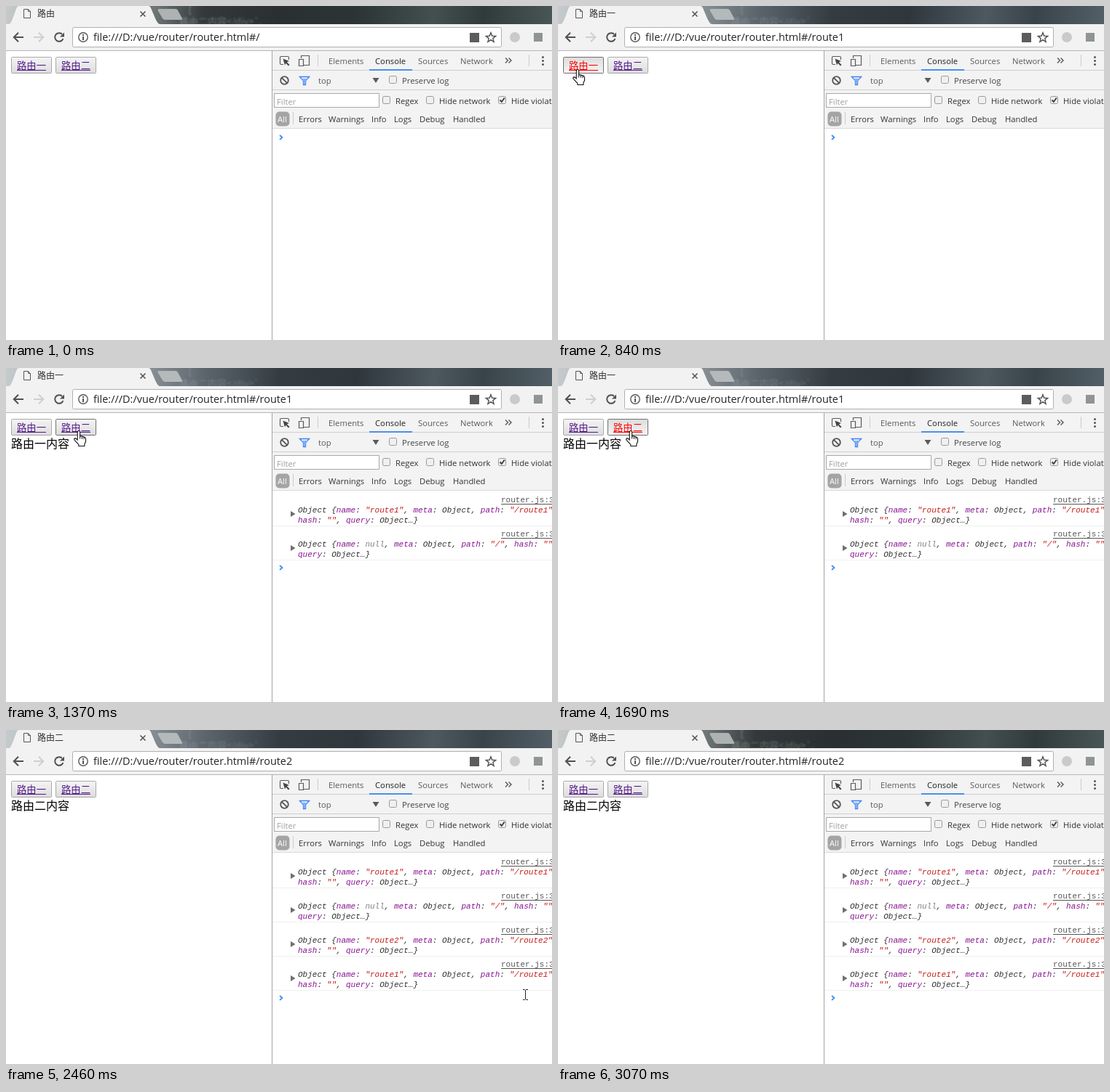
Animation, 750 px wide and 460 px high, one loop 3.15 s. Source, as an HTML page with a canvas:

```html
<!DOCTYPE html>
<html lang="zh">
<head>
<meta charset="utf-8">
<title>路由</title>
<style>
html, body { margin: 0; width: 100%; height: 100%; overflow: hidden; background: #fff; }
canvas { display: block; width: 750px; height: 460px; }
</style>
</head>
<body>
<canvas id="stage" width="750" height="460"></canvas>
<script>
const ctx = document.getElementById('stage').getContext('2d');
const LOOP = 3150;
const UI = '"Open Sans", "Noto Sans", sans-serif';
const CJK = '"Noto Sans CJK SC", "Noto Sans CJK", sans-serif';
const MONO = '"Liberation Mono", monospace';
const NAME = '#881391', STRING = '#c41a16', NULL = '#808080', PLAIN = '#303030';

// Pointer: start time, left, top, shape
const pointer = [
  [0, 0, 0, ''],
  [210, 276, 272, 'arrow'], [290, 121, 166, 'arrow'], [360, 33, 101, 'arrow'], [440, 14, 91, 'arrow'],
  [610, 17, 88, 'hand'], [690, 20, 87, 'hand'], [990, 50, 88, 'hand'], [1070, 88, 89, 'hand'],
  [1140, 90, 88, 'hand'], [1220, 91, 87, 'hand'], [1290, 92, 87, 'hand'], [1370, 93, 86, 'hand'],
  [2230, 127, 100, 'arrow'], [2310, 280, 172, 'arrow'], [2380, 545, 283, 'beam'], [2460, 709, 357, 'beam'],
  [2560, 719, 405, 'arrow'], [2630, 725, 427, 'arrow'], [2700, 727, 435, 'arrow'], [2780, 736, 449, 'arrow'],
  [2840, 0, 0, '']
];
const logs = [['route1', '/route1'], [null, '/'], ['route2', '/route2'], ['route1', '/route1']];
const arrowPath = new Path2D('M.5.5V16.2L4.1 12.8L6.6 18.3L9 17.3L6.6 11.9H11.4Z');
const handPath = new Path2D('M5.2 13V2.2a1.7 1.7 0 0 1 3.4 0V7.6l2.8.5 2.6.8q2.5.8 2.5 2.6V15.5l-1.6 3.2V21.5H6.8V19.4L1.2 13.3q-1.2-1.9.5-2.4 1.5-.3 3.5 2.1z');

function rect(x, y, w, h, color) {
  ctx.fillStyle = color;
  ctx.fillRect(x, y, w, h);
}

function box(x, y, w, h, r, fill, border) {
  ctx.beginPath();
  ctx.roundRect(x + .5, y + .5, w - 1, h - 1, r);
  ctx.fillStyle = fill;
  ctx.fill();
  if (border) line(border, 1);
}

function line(color, width, path) {
  ctx.strokeStyle = color;
  ctx.lineWidth = width;
  path ? ctx.stroke(new Path2D(path)) : ctx.stroke();
}

function shape(path, color) {
  ctx.fillStyle = color;
  ctx.fill(new Path2D(path));
}

function circle(x, y, r, fill, border, width) {
  ctx.beginPath();
  ctx.arc(x, y, r, 0, 7);
  if (fill) { ctx.fillStyle = fill; ctx.fill(); }
  if (border) line(border, width);
}

function text(str, x, y, font, color) {
  ctx.font = font;
  ctx.fillStyle = color;
  ctx.fillText(str, x, y);
}

function label(str, x, y, color = '#333') {
  text(str, x, y, '11.25px ' + UI, color);
}

function glass(light) {
  const g = ctx.createLinearGradient(0, 0, 750, 60);
  const tones = light
    ? ['#c5cacd', '#858d92', '#5c666c', '#343c42', '#2f373d', '#4d595f', '#39434a', '#536067']
    : ['#c6cac9', '#6f7676', '#33393a', '#2a3031', '#2c3435', '#43504f', '#303a3a', '#4a5757'];
  [0, .27, .36, .5, .64, .78, .87, 1].forEach((p, i) => g.addColorStop(p, tones[i]));
  ctx.save();
  ctx.beginPath();
  ctx.rect(0, 0, 750, 25);
  ctx.clip();
  rect(0, 0, 750, 25, g);
  ctx.filter = 'blur(1px)';
  const ghost = light ? 'rgba(190,200,208,.3)' : 'rgba(190,205,200,.38)';
  text('[', 249, 9, '13px ' + MONO, ghost);
  text('路由二内容</div>`,', 238, 26, '13px ' + CJK, ghost);
  ctx.restore();
}

function browser(route, light) {
  glass(light);
  const suffix = ['', '一', '二'][route];
  shape('M4 25C7 24 8 20 10 15L14 4Q15.5 0 18 0H196Q198 0 199.5 4L205 17Q208 24 211 25Z', '#f2f2f2');
  shape('M210 4H233Q235 4 236 6L242 17Q242.5 19 240 19H219Q216 19 215 17L208.5 6Q208 4 210 4Z', light ? '#b4b9bc' : '#aeb2b2');
  line('#555', 1, 'M24.5 4.5H30.5L33.5 7.5V16.5H24.5ZM30.5 4.5V7.5H33.5');
  text('路由' + suffix, 43, 15, '12px ' + CJK, '#333');
  line('#555', 1.6, 'M184.5 7.5L191.5 14.5M191.5 7.5L184.5 14.5');

  rect(0, 25, 750, 36, '#f2f2f2');
  rect(0, 61, 750, 1, '#b6b6b6');
  line('#505050', 2, 'M24 43H11M17 36.8L10.8 43L17 49.2');
  line('#cfcfcf', 2, 'M38 43H51M45 36.8L51.2 43L45 49.2');
  ctx.beginPath();
  ctx.arc(73, 43, 5.8, .35, 5.5);
  line('#505050', 2);
  shape('M80 36.5V42.5H74Z', '#505050');

  box(91, 29, 590, 28, 2, '#fff', '#b0b0b0');
  circle(106, 43, 6.2, null, '#555', 1.4);
  rect(105, 42, 2, 5, '#555');
  rect(105, 39, 2, 2, '#555');
  text('file:///D:/vue/router/router.html#/' + (route ? 'route' + route : ''), 120, 48, '14.45px ' + UI, '#222');
  rect(637, 37, 13, 13, '#5c5c5c');
  ctx.beginPath();
  for (let i = 0; i < 10; i++) {
    const a = i * Math.PI / 5 - Math.PI / 2, r = i % 2 ? 3 : 7;
    ctx.lineTo(666 + r * Math.cos(a), 43.7 + r * Math.sin(a));
  }
  ctx.closePath();
  line('#505050', 1.4);
  circle(699, 43, 7, '#cacaca');
  rect(725, 37, 12, 12, '#8f9495');
}

function button(str, x, hover, pressed) {
  const g = ctx.createLinearGradient(0, 70, 0, 93);
  g.addColorStop(0, pressed ? '#dcdcdc' : '#f5f5f5');
  g.addColorStop(1, pressed ? '#f5f5f5' : '#dcdcdc');
  box(x, 70, 56, 23, 1, g, hover ? '#707070' : '#a9a9a9');
  const color = pressed ? '#f00' : '#551a8b';
  text(str, x + 8, 87, '13.333px ' + CJK, color);
  rect(x + 8, 88, 40, 1, color);
}

function checkbox(x, y, checked) {
  box(x, y, 11, 11, 2, '#f0f0f0', '#999');
  if (checked) line('#444', 2, `M${x + 2.5} ${y + 5.5}l2.3 2.5l4-5.5`);
}

function devtools() {
  rect(365, 62, 1, 398, '#a3a3a3');
  rect(366, 62, 384, 106, '#f3f3f3');
  for (const y of [88, 115, 168]) rect(366, y, 384, 1, y === 168 ? '#dadada' : '#cfcfcf');

  line('#5a5a5a', 1.2, 'M381 80.5H378Q376.5 80.5 376.5 79V71Q376.5 69.5 378 69.5H387Q388.5 69.5 388.5 71V74');
  shape('M380.5 72.5L389 76L385.8 77.2L389.5 81L388 82.4L384.4 78.7L383 81.5Z', '#444');
  line('#5a5a5a', 1.2, 'M405.5 72V68.5H416.5V81.5H409M402.5 73.5H408.5V82.5H402.5Z');
  rect(428, 67, 1, 16, '#ccc');
  rect(718, 67, 1, 16, '#ccc');
  label('Elements', 443, 80, '#5a5a5a');
  label('Console', 507, 80, '#222');
  label('Sources', 566, 80, '#5a5a5a');
  label('Network', 624, 80, '#5a5a5a');
  rect(499, 87, 59, 2, '#4a90ee');
  line('#555', 1.4, 'M686 71.5L689.5 75L686 78.5M690.5 71.5L694 75L690.5 78.5');
  for (const y of [70, 75, 80]) circle(737.5, y + .5, 1.5, '#555');

  circle(382.5, 102.5, 5.3, null, '#555', 1.8);
  line('#555', 1.8, 'M378.8 98.8L386.2 106.2');
  line('#3e82f7', 1.4, 'M403.5 97.5H416.5L411.5 103V108.5H408.5V103Z');
  shape('M405 100H415L411.5 103V108H408.5V103Z', '#7fb0f7');
  label('top', 429, 107, '#5a5a5a');
  shape('M503.5 99H512.5L508 106Z', '#5a5a5a');
  checkbox(526, 96);
  label('Preserve log', 544, 107, '#444');

  box(368, 120, 145, 20, 0, '#fff', '#a9a9a9');
  label('Filter', 372, 136, '#a0a0a0');
  checkbox(517, 124);
  label('Regex', 535, 135);
  checkbox(577, 124);
  label('Hide network', 595, 135);
  checkbox(676, 124, true);
  label('Hide violations', 694, 135);

  box(370, 145, 20, 21, 5, '#a4a4a4');
  label('All', 373, 160, '#fff');
  rect(394, 146, 1, 17, '#ccc');
  [['Errors', 402], ['Warnings', 443], ['Info', 502], ['Logs', 533], ['Debug', 568], ['Handled', 614]]
    .forEach(([str, x]) => label(str, x, 160));
}

// Draws [string, colour] pairs one after another
function runs(parts, x, y) {
  for (const [str, color] of parts) {
    text(str, x, y, 'italic 11px ' + MONO, color);
    x += ctx.measureText(str).width;
  }
}

function logEntry([name, path], i) {
  const y = 170 + 47 * i;
  const field = (key, value, color = PLAIN, end = ', ') => [[key, NAME], [': ', PLAIN], [value, color], [end, PLAIN]];
  const hash = field('hash', '""', STRING), query = field('query', 'Object…', PLAIN, '}');
  const first = [
    ['Object {', PLAIN],
    ...(name ? field('name', `"${name}"`, STRING) : field('name', 'null', NULL)),
    ...field('meta', 'Object'),
    ...field('path', `"${path}"`, STRING)
  ];
  text('router.js:3', 680, y + 15, '11px ' + MONO, '#545454');
  rect(680, y + 17, 70, 1, '#545454');
  shape(`M391 ${y + 27}L397.5 ${y + 31}L391 ${y + 35}Z`, '#6e6e6e');
  runs(name ? first : first.concat(hash), 401, y + 29);
  runs(name ? hash.concat(query) : query, 401, y + 43);
  rect(366, y + 47, 384, 1, '#f0f0f0');
}

function drawPointer(x, y, kind) {
  if (!kind) return;
  ctx.save();
  ctx.translate(x, y);
  if (kind === 'beam') {
    line('#222', 1, 'M1 .5H3.5L4.5 1.5L5.5.5H8M4.5 1V14M1 14.5H3.5L4.5 13.5L5.5 14.5H8');
  } else {
    const path = kind === 'hand' ? handPath : arrowPath;
    ctx.fillStyle = '#fff';
    ctx.fill(path);
    ctx.strokeStyle = '#111';
    ctx.lineWidth = 1.1;
    ctx.stroke(path);
    if (kind === 'hand') line('#111', 1, 'M8.6 7.5V11.5M11.3 8.5V11.8M14 9.3V12.2');
  }
  ctx.restore();
}

function draw(t) {
  const within = (a, b) => t >= a && t < b;
  const route = t < 840 ? 0 : t < 1850 ? 1 : 2;
  const count = t < 920 ? 0 : t < 1850 ? 2 : 4;

  rect(0, 0, 750, 460, '#fff');
  browser(route, within(840, 3070));
  button('路由一', 7, within(440, 1070), within(760, 920));
  button('路由二', 68, within(1070, 2230), within(1690, 1850));
  if (count) text(`路由${route === 1 ? '一' : '二'}内容`, 7, 110, '16px ' + CJK, '#000');

  devtools();
  logs.slice(0, count).forEach(logEntry);
  line('#3d87f5', 1.7, `M376 ${178 + 47 * count}l3.5 3l-3.5 3`);

  const [, x, y, kind] = pointer.filter(p => p[0] <= t).pop();
  drawPointer(x, y, kind);
}

const start = performance.now();
function tick() {
  draw((performance.now() - start) % LOOP);
  requestAnimationFrame(tick);
}
tick();
</script>
</body>
</html>
```
